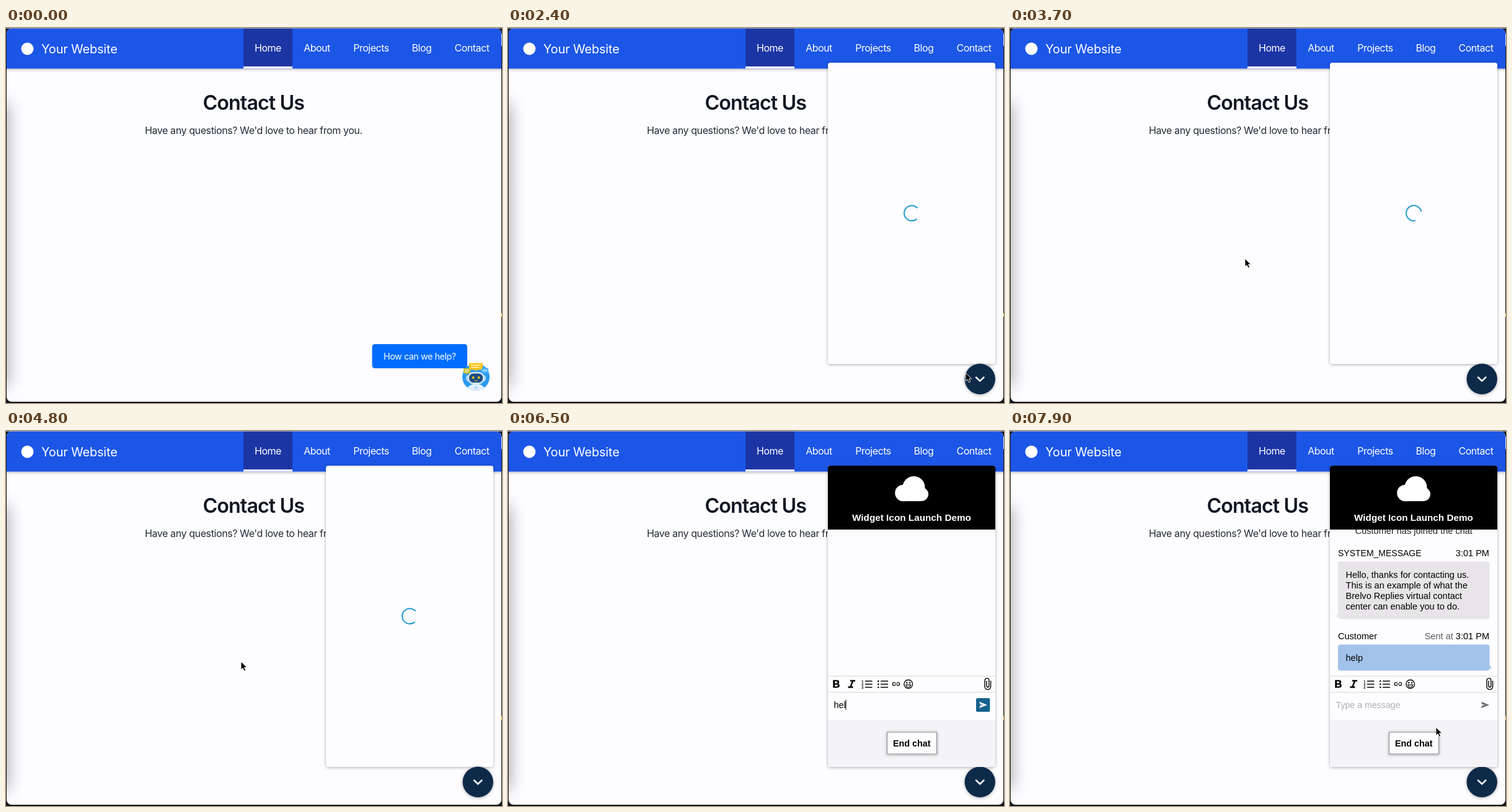
Animation of 800x605 px, one loop 8000 ms. Source, as an HTML page:

```html
<!DOCTYPE html>
<html lang="en">
<head>
<meta charset="utf-8">
<title>Chat widget demo</title>
<style>
  html, body { margin: 0; width: 100%; height: 100%; overflow: hidden; background: #10131d; }
  svg { display: block; width: 100vw; height: 100vh; }
  .ui { font-family: Inter, sans-serif; font-size: 16px; letter-spacing: -.03em; }
  .brand { font-size: 20px; letter-spacing: -.2px; }
  .title { font-size: 32.2px; font-weight: 600; letter-spacing: -.9px; }
  .lead { letter-spacing: -.4px; }
  .hint { font-size: 14.3px; }
  .chat { font-family: "Liberation Sans", Arial, sans-serif; font-size: 14.55px; }
  .mid { text-anchor: middle; }
  .end { text-anchor: end; }
  .bold { font-weight: 700; }
  .line { fill: none; stroke: #000; }
</style>
</head>
<body>
<svg viewBox="0 0 800 605" preserveAspectRatio="none">
  <defs>
    <filter id="soft" x="-300%" y="-20%" width="700%" height="140%"><feGaussianBlur stdDeviation="14"/></filter>
    <filter id="lift" x="-20%" y="-20%" width="140%" height="140%">
      <feDropShadow dx="0" dy="1" stdDeviation="2.5" flood-opacity=".32"/>
    </filter>
    <clipPath id="page"><rect x="1" y="1" width="798" height="602" rx="8"/></clipPath>
    <clipPath id="panel"><rect x="516" y="56" width="270" height="486" rx="4"/></clipPath>
    <clipPath id="log"><rect x="516" y="159" width="270" height="236"/></clipPath>
    <clipPath id="face"><circle cx="758" cy="563" r="22"/></clipPath>
    <path id="plane" d="M0 0L13 5.2L0 10.4L1.6 6L8 5.2L1.6 4.4Z"/>
    <path id="beamShape" fill="none" stroke-linecap="round" d="M-3 -6.5Q0 -6.5 0 -4.5Q0 -6.5 3 -6.5M0 -4.5V4.5M-3 6.5Q0 6.5 0 4.5Q0 6.5 3 6.5M-1.5 1.5H1.5"/>
  </defs>

  <rect width="800" height="605" fill="#10131d"/>
  <path d="M0 .5H800" stroke="#8fa3c4"/>
  <path d="M799.5 9V29" stroke="#dfe3ea"/>
  <path d="M799 460V466" stroke="#d9a92c" stroke-width="2"/>

  <g clip-path="url(#page)">
    <rect x="1" y="1" width="798" height="602" fill="#fdfcfe"/>
    <rect x="-60" y="122" width="62" height="456" fill="#000" opacity=".37" filter="url(#soft)"/>
    <rect x="-4" y="1" width="808" height="64.5" fill="#1f57e7" filter="url(#lift)"/>
    <rect x="383" y="1" width="79" height="61" fill="#1b35a4"/>
    <rect x="383" y="62" width="79" height="3.5" fill="#fff"/>
    <circle cx="34.5" cy="33.5" r="10" fill="#fff"/>
    <g class="ui" fill="#fff">
      <text class="brand" x="57" y="41">Your Website</text>
      <g class="mid">
        <text x="422.5" y="37.5">Home</text>
        <text x="501.5" y="37.5">About</text>
        <text x="589" y="37.5">Projects</text>
        <text x="670.5" y="37.5">Blog</text>
        <text x="751.5" y="37.5">Contact</text>
      </g>
    </g>
    <g class="ui mid">
      <text class="title" x="399.3" y="132" fill="#111622">Contact Us</text>
      <text class="lead" x="399.3" y="170.5" fill="#232a37">Have any questions? We'd love to hear from you.</text>
    </g>

    <!-- launcher -->
    <g data-show="0 2200">
      <rect x="590.5" y="510" width="153.5" height="39" rx="4.5" fill="#006dff"/>
      <text class="ui hint mid" x="667.3" y="535" fill="#fff">How can we help?</text>
      <circle cx="758" cy="563" r="22" fill="#2b9af3"/>
      <g clip-path="url(#face)">
        <ellipse cx="758" cy="583" rx="14" ry="9" fill="#e3f1fc"/>
        <path d="M736 569Q744 586 758 586V592H736Z" fill="#6db9f6"/>
        <circle cx="758" cy="580" r="2.6" fill="#b5dbf7"/>
      </g>
      <rect x="742" y="560" width="32" height="10" rx="4" fill="#a9d3f5"/>
      <rect x="744.5" y="555" width="27" height="19.5" rx="9" fill="#d5e9fa"/>
      <rect x="747" y="557.5" width="22" height="14.5" rx="6.5" fill="#1d4d80"/>
      <g fill="#f7c51e">
        <circle cx="753.5" cy="564" r="2"/><circle cx="762.5" cy="564" r="2"/>
        <path d="M747 540.5H769V551.5H760L758 554L756 551.5H747Z"/>
        <path d="M738 549H749V557H745L742 559.5V557H738Z" fill="#c9c02c"/>
      </g>
      <path d="M755 568.5Q758 570.5 761 568.5" fill="none" stroke="#f7c51e"/>
      <path d="M767 548.5H778V556H774L771 559V556H767Z" fill="#53b4ff"/>
      <path d="M750 544H766M750 547.5H763M740 552H747M740 554.5H745" stroke="#fff" stroke-width="1.2"/>
      <path d="M769 552.5H776" stroke="#fff" stroke-width="1.6" stroke-dasharray="1.6 1"/>
    </g>

    <!-- widget -->
    <g data-show="2200 8000">
      <rect x="516" y="56" width="270" height="486" rx="4" fill="#fdfcfe" filter="url(#lift)"/>
      <circle cx="761.2" cy="566.3" r="24.7" fill="#112a48" filter="url(#lift)"/>
      <path d="M755 563.5L761.2 569.5L767.4 563.5" fill="none" stroke="#fff" stroke-width="2.5" stroke-linecap="round" stroke-linejoin="round"/>
      <g data-show="2200 5500">
        <circle id="spinner" cx="651.3" cy="298.7" r="12.3" fill="none" stroke="#229bd0" stroke-width="2" pathLength="360" stroke-dasharray="270 90" stroke-dashoffset="-48"/>
      </g>
    </g>

    <g class="chat" data-show="5500 8000">
      <g clip-path="url(#panel)">
        <rect x="516" y="56" width="270" height="103" fill="#000"/>
        <rect x="516" y="466" width="270" height="76" fill="#f4f3f5"/>
        <path d="M516 395.5H786M516 421.5H786" stroke="#dad9dc"/>
      </g>
      <g fill="#fff">
        <circle cx="654.5" cy="91" r="18"/><circle cx="637.5" cy="100" r="13.3"/>
        <circle cx="667" cy="102" r="11"/><rect x="637" y="93" width="30" height="20.2"/>
        <text class="mid bold" x="651" y="145" font-size="15.3">Widget Icon Launch Demo</text>
      </g>

      <!-- toolbar -->
      <text class="bold" x="523.5" y="414.2" font-size="16.5" stroke="#000" stroke-width=".5">B</text>
      <path class="line" stroke-width="2.4" d="M552 403H560M548.5 413.2H556.5M556.3 403L552.2 413.2"/>
      <path class="line" stroke-width="1.6" d="M576 403.5H587.5M576 408.5H587.5M576 413.5H587.5M601 403.5H613M601 408.5H613M601 413.5H613"/>
      <g class="mid bold" font-size="5.5">
        <text x="571.7" y="405.5">1</text><text x="571.7" y="410.6">2</text><text x="571.7" y="415.8">3</text>
      </g>
      <circle cx="597.3" cy="403.5" r="1.3"/><circle cx="597.3" cy="408.5" r="1.3"/><circle cx="597.3" cy="413.5" r="1.3"/>
      <path class="line" stroke-width="1.2" d="M625 405.5H622.8A2.6 2.6 0 0 0 622.8 410.7H625M627 405.5H629A2.6 2.6 0 0 1 629 410.7H627M623.3 408.1H628.6"/>
      <circle class="line" cx="645.7" cy="408.4" r="6.9" stroke-width="1.3"/>
      <circle cx="643.2" cy="406.3" r="1.2"/><circle cx="648.2" cy="406.3" r="1.2"/>
      <path class="line" stroke-width="1.1" d="M641.6 409.6H649.8Q648.8 413.3 645.7 413.3T641.6 409.6Z"/>
      <path class="line" stroke-width="1.4" stroke-linecap="round" d="M778.6 403.5V412.3A4.8 4.8 0 0 1 769 412.3V402.3A3.3 3.3 0 0 1 775.8 402.3V411.3A1.9 1.9 0 0 1 772 411.3V403.5"/>

      <!-- draft -->
      <text data-show="5500 6150" x="525.5" y="447" font-size="14.2" fill="#b0aeb3">Type a message</text>
      <g id="draft"></g>
      <g data-show="6150 6900">
        <rect x="755" y="431" width="22.3" height="22" rx="2" fill="#15628d"/>
        <use href="#plane" x="760" y="436.7" fill="#fff"/>
      </g>
      <use data-show="5500 6150" href="#plane" x="760" y="436.7" fill="#69676c"/>

      <!-- conversation -->
      <g data-show="6900 8000">
        <g clip-path="url(#log)">
          <text class="mid" x="651.3" y="166" fill="#222">Customer has joined the chat</text>
          <text x="529" y="201.5" font-size="14">SYSTEM_MESSAGE</text>
          <text class="end" x="773" y="201.5">3:01 PM</text>
          <path d="M530 294L524.5 300H532Z" fill="#e7e5e7"/>
          <rect x="529" y="210.5" width="244.5" height="93" rx="4" fill="#e7e5e7"/>
          <text y="236.5">
            <tspan x="541.5">Hello, thanks for contacting us.</tspan>
            <tspan x="541.5" dy="17.1">This is an example of what the</tspan>
            <tspan x="541.5" dy="17.1">Brelvo Replies virtual contact</tspan>
            <tspan x="541.5" dy="17.1">center can enable you to do.</tspan>
          </text>
          <text x="529" y="335.5">Customer</text>
          <text class="end" x="773" y="335.5"><tspan fill="#5d5b60">Sent at</tspan> 3:01 PM</text>
          <path d="M772 376L777.5 383H770Z" fill="#a2c2ea"/>
          <rect x="529" y="344.5" width="244.5" height="42" rx="4" fill="#a2c2ea"/>
          <text x="541.5" y="370.5">help</text>
          <rect data-show="6900 7650" x="778" y="175" width="6.2" height="218" rx="3.1" fill="#737176"/>
        </g>
        <text x="525.5" y="447" font-size="14.2" fill="#b0aeb3">Type a message</text>
        <use href="#plane" x="760" y="436.7" fill="#69676c"/>
        <path data-show="6900 7450" d="M526.5 433.5V450" stroke="#000"/>
      </g>

      <rect x="611.5" y="486" width="80" height="35" fill="#fdfcfe" stroke="#8a888d" filter="url(#lift)"/>
      <text class="mid bold" x="651.3" y="509" font-size="14.35">End chat</text>
    </g>
  </g>

  <g id="cursor">
    <path id="arrow" d="M0 0V13.2L3 10.5L5.2 15.2L7.6 14.1L5.4 9.6L9.6 9.3Z" stroke="#fff" stroke-width=".9"/>
    <g id="beam">
      <use href="#beamShape" stroke="#fff" stroke-width="2.6"/>
      <use href="#beamShape" stroke="#111" stroke-width="1.2"/>
    </g>
  </g>
</svg>
<script>
  const LOOP = 8000;
  const byId = id => document.getElementById(id);
  const within = (t, from, to) => t >= from && t < to;
  const toggle = (el, on) => { el.style.display = on ? '' : 'none'; };

  // Each typed state: text, start time, caret position
  const typing = [['h', 6150, 534.5], ['he', 6250, 542.5], ['hel', 6400, 545], ['help', 6650, 553.5]];
  byId('draft').innerHTML = typing.map(([word, from, caret], i) => `
    <g data-show="${from} ${typing[i + 1]?.[1] ?? 6900}">
      <text x="525.5" y="447">${word}</text>
      <path d="M${caret} 433.5V450" stroke="#000"/>
    </g>`).join('');

  const timed = [...document.querySelectorAll('[data-show]')]
    .map(el => [el, ...el.dataset.show.split(' ').map(Number)]);

  // Pointer stops: time, x, y
  const stops = [
    [1400, 747, 606], [1700, 750, 588], [2000, 757, 567], [2250, 757, 567],
    [2700, 685, 527], [3500, 379, 372], [4900, 379, 372], [5800, 688, 454],
    [7500, 688, 454], [7800, 687, 478], [LOOP, 687, 478]
  ];

  function pointerAt(t) {
    const i = Math.max(1, stops.findIndex(stop => stop[0] > t));
    const [t0, x0, y0] = stops[i - 1], [t1, x1, y1] = stops[i];
    const k = Math.max(0, (t - t0) / (t1 - t0));
    const ease = k * k * (3 - 2 * k);
    return [x0 + (x1 - x0) * ease, y0 + (y1 - y0) * ease];
  }

  function draw(now) {
    const t = now % LOOP;
    for (const [el, from, to] of timed) toggle(el, within(t, from, to));
    byId('spinner').setAttribute('transform', `rotate(${t * 0.3} 651.3 298.7)`);

    const [x, y] = pointerAt(t);
    const overInput = within(t, 5650, 7650);
    byId('cursor').setAttribute('transform', `translate(${x} ${y})`);
    toggle(byId('cursor'), t >= 1400 && !within(t, 6150, 7100));
    toggle(byId('arrow'), !overInput);
    toggle(byId('beam'), overInput);
  }

  const start = performance.now();
  function tick() {
    draw(performance.now() - start);
    requestAnimationFrame(tick);
  }
  tick();
</script>
</body>
</html>
```
